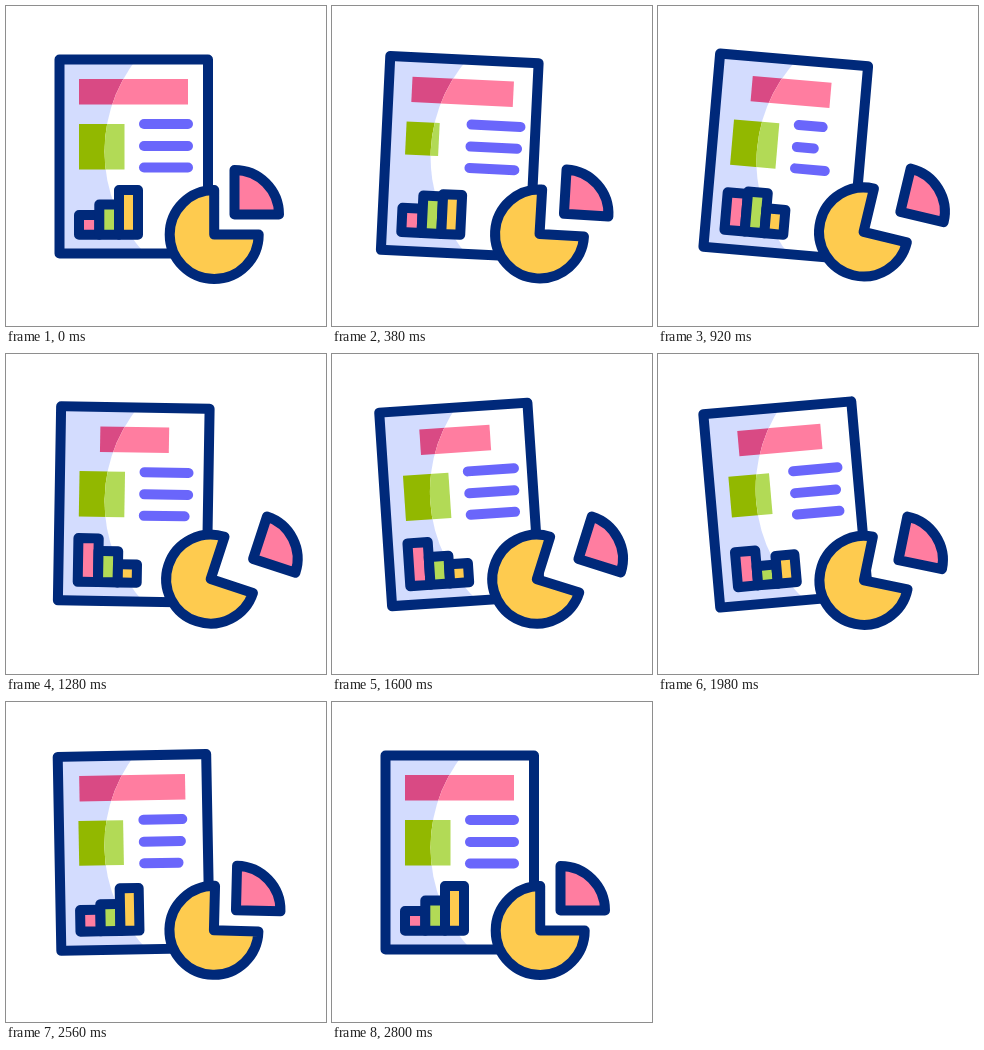
An HTML page with a canvas that plays this animation: 320 px wide and 320 px high, repeating every 2.82 s.

```html
<!DOCTYPE html>
<html lang="en">
<head>
<meta charset="utf-8">
<title>Report</title>
<style>
  html, body { margin: 0; width: 100%; height: 100%; overflow: hidden; background: #fff; }
  canvas { display: block; width: 100vmin; height: 100vmin; }
</style>
</head>
<body>
<canvas id="stage"></canvas>
<script>
const LOOP = 2820, END = 2800, HALF = 1400;
const NAVY = '#00297a', PINK = '#ff7da0', PINK_DARK = '#d94a84', YELLOW = '#fecb4f';
const GREEN = '#b2da56', GREEN_DARK = '#92b800', LINE = '#6a66fb', TINT = '#d3dcfe';

const canvas = document.getElementById('stage');
const ctx = canvas.getContext('2d');

const smooth = p => p * p * (3 - 2 * p);
const mix = (a, b, p) => a + (b - a) * p;

// keys: [time, value] pairs, eased between neighbours
function track(keys, t) {
  for (let i = 1; i < keys.length; i++) {
    const [t0, a] = keys[i - 1], [t1, b] = keys[i];
    if (t <= t1) return mix(a, b, smooth((t - t0) / (t1 - t0)));
  }
  return keys[keys.length - 1][1];
}

const TILT = [[0, 0], [710, 5], [880, 5], [1800, -5], [2000, -5], [END, 0]];
const SQUARE = [[0, 1], [200, 1], [560, 0.46], [920, 1], [HALF, 1]];
const MIDDLE_BAR = [[0, 198.5], [700, 185.5], [1400, 198.5], [2100, 210.3], [END, 198.5]];
const LINES = [
  [118, [[0, 44], [450, 49.3], [920, 24], [1280, 44], [HALF, 44]]],
  [140, [[0, 44], [450, 46.8], [920, 17], [1280, 44], [HALF, 44]]],
  [161.5, [[0, 44], [450, 45], [1000, 29], [HALF, 44]]]
];

function outline(fill) {
  ctx.fillStyle = fill;
  ctx.fill();
  ctx.strokeStyle = NAVY;
  ctx.stroke();
}

function box(x, y, w, h, fill) {
  ctx.fillStyle = fill;
  ctx.fillRect(x, y, w, h);
}

function blocks(barWidth, side, pink, green) {
  box(127.5 - barWidth / 2, 73, barWidth, 25.5, pink);
  box(73, 118, side, side, green);
}

function drawPage(t, swing) {
  const barWidth = mix(109, 68, swing);
  const side = 45.5 * track(SQUARE, Math.min(t, END - t));

  ctx.save();
  ctx.translate(127.5, 150.5);
  ctx.rotate(track(TILT, t) * Math.PI / 180);
  ctx.translate(-127.5, -150.5);

  box(53.5, 53.5, 148.5, 194, TINT);
  blocks(barWidth, side, PINK_DARK, GREEN_DARK);

  // lit part of the sheet
  ctx.save();
  ctx.beginPath();
  ctx.rect(53.5, 53.5, 148.5, 194);
  ctx.clip();
  ctx.beginPath();
  ctx.arc(247.5, 145.5, 149, 0, Math.PI * 2);
  ctx.clip();
  box(53.5, 53.5, 148.5, 194, '#fff');
  blocks(barWidth, side, PINK, GREEN);
  ctx.restore();

  ctx.strokeStyle = LINE;
  for (const [y, keys] of LINES) {
    ctx.beginPath();
    ctx.moveTo(138, y);
    ctx.lineTo(138 + track(keys, t % HALF), y);
    ctx.stroke();
  }

  const bars = [
    [73, 93.3, mix(209, 184.5, swing), PINK],
    [93.3, 113, track(MIDDLE_BAR, t), GREEN],
    [113, 132, mix(184, 211, swing), YELLOW]
  ];
  for (const [x0, x1, top, fill] of bars) {
    ctx.beginPath();
    ctx.rect(x0, top, x1 - x0, 228.7 - top);
    outline(fill);
  }

  ctx.beginPath();
  ctx.rect(53.5, 53.5, 148.5, 194);
  ctx.strokeStyle = NAVY;
  ctx.stroke();
  ctx.restore();
}

function sector(x, y, turn, from, to, fill) {
  ctx.beginPath();
  ctx.moveTo(x, y);
  ctx.arc(x, y, 44.5, from + turn, to + turn);
  ctx.closePath();
  outline(fill);
}

function drawPie(swing) {
  const turn = 18.5 * swing * Math.PI / 180;
  sector(208.2 - 3.6 * swing, 228.6 - 3.6 * swing, turn, 0, Math.PI * 1.5, YELLOW);
  sector(228.5 + 19 * swing, 208.5 - 3.7 * swing, turn, -Math.PI / 2, 0, PINK);
}

function frame(now) {
  const t = Math.min(now % LOOP, END);
  const swing = smooth(1 - Math.abs(t - HALF) / HALF);
  const size = Math.round(Math.min(innerWidth, innerHeight) * devicePixelRatio);
  if (canvas.width !== size) canvas.width = canvas.height = size;
  ctx.setTransform(size / 320, 0, 0, size / 320, 0, 0);
  ctx.clearRect(0, 0, 320, 320);
  ctx.lineWidth = 10;
  ctx.lineCap = ctx.lineJoin = 'round';
  drawPage(t, swing);
  drawPie(swing);
}

const start = performance.now();
function tick() {
  frame(performance.now() - start);
  requestAnimationFrame(tick);
}
tick();
</script>
</body>
</html>
```
